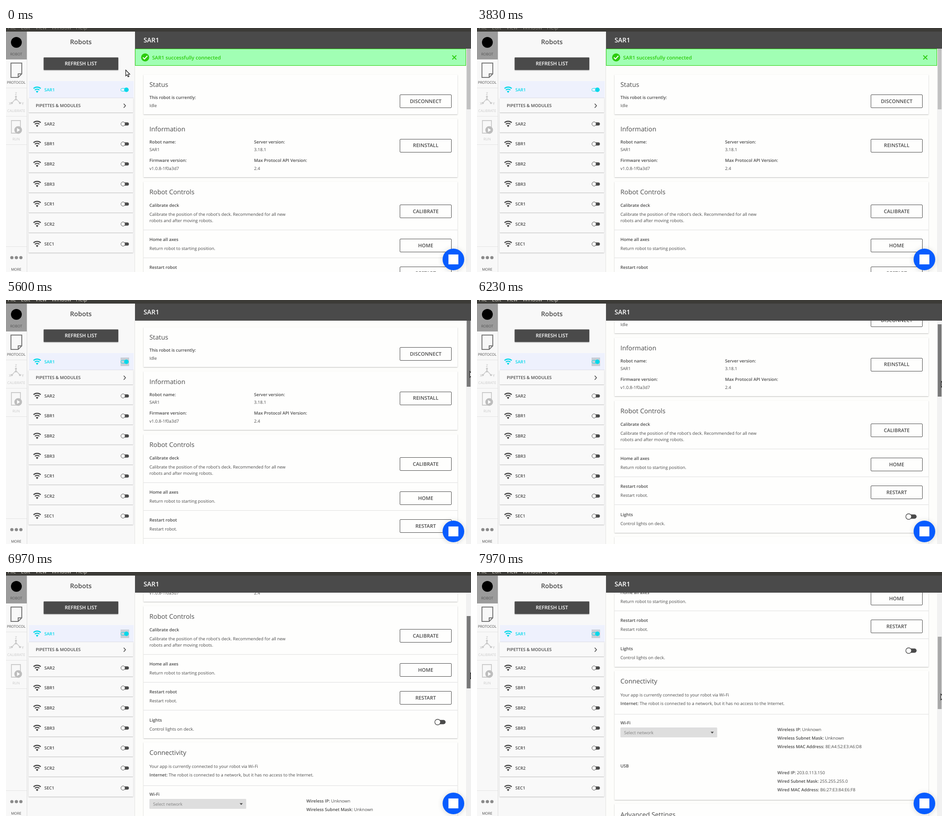
Recreate the animation shown at these times as an HTML page. Size 1031 by 543 pixels, loop 8000 ms.

```html
<!DOCTYPE html>
<html lang="en">
<head>
<meta charset="utf-8">
<title>Robot settings</title>
<style>
  html, body { margin: 0; width: 100%; height: 100%; overflow: hidden; background: #fdfdfb; }
  svg { display: block; width: 100%; height: 100%; }
  text { font-family: "Open Sans", sans-serif; white-space: pre; text-rendering: geometricPrecision; }
  .card, .row { filter: drop-shadow(0 1px .8px rgba(0, 0, 0, .26)); }
  .chat { filter: drop-shadow(0 1px 6px rgba(0, 0, 0, .16)); }
</style>
</head>
<body>
<svg id="stage" viewBox="0 0 1031 543"></svg>
<script>
const DARK = '#4a4a4a', CYAN = '#00d8ea', GREEN = '#2bcc0c', PALE = '#cacaca', WHITE = '#fefefd';
const LOOP = 8000, PRESS = 5000, RELEASE = 7970;

// Drawing helpers; text is placed by the vertical middle of its capitals.
const text = (x, y, str, { size = 9.54, weight = 400, fill = DARK, anchor = 'start' } = {}) =>
  `<text x="${x}" y="${y + size * .36}" font-size="${size}" font-weight="${weight}" fill="${fill}" text-anchor="${anchor}">${str}</text>`;
const bold = (x, y, str, fill = DARK) => text(x, y, str, { weight: 600, fill });
const title = (y, str) => text(318, y, str, { size: 14.3 });
const rect = (x, y, w, h, fill, extra = '') =>
  `<rect x="${x}" y="${y}" width="${w}" height="${h}" fill="${fill}" ${extra}/>`;
const circle = (x, y, r, fill, extra = '') => `<circle cx="${x}" cy="${y}" r="${r}" fill="${fill}" ${extra}/>`;
const line = (d, stroke, width = 1, fill = 'none') =>
  `<path d="${d}" fill="${fill}" stroke="${stroke}" stroke-width="${width}"/>`;
const at = (x, y, inner, scale = 1) => `<g transform="translate(${x} ${y}) scale(${scale})">${inner}</g>`;

const card = (top, bottom) => rect(305, top, 696, bottom - top, WHITE, 'class="card"');
const divider = y => rect(305, Math.floor(y), 696, 1, '#dedede');
const field = (x, y, label, value) => bold(x, y, label) + text(x, y + 17.5, value);
const pair = (x, y, label, value) => text(x, y, `<tspan font-weight="600">${label}</tspan> ${value}`);
const button = (y, label) =>
  rect(873.5, Math.floor(y - 14.5) + .5, 114, 29, WHITE, `rx="1.5" stroke="${DARK}"`) +
  text(930.5, y, label, { size: 11.1, weight: 600, anchor: 'middle' });

const toggleOff = (x, y, scale = 1) => at(x, y,
  rect(-5, -3.5, 14, 7, DARK, 'rx="3.5"') + circle(-4, 0, 4.6, WHITE, `stroke="${DARK}"`), scale);
const toggleOn = (x, y) => at(x, y,
  rect(-8.5, -3.2, 15, 6.4, 'none', `rx="3.2" stroke="${CYAN}"`) + circle(4, 0, 5, CYAN));
const wifi = (y, color) => at(69, y,
  line('M-8-2.8A11.8 11.8 0 0 1 8-2.8', color, 2.4) +
  line('M-5 .6A7.4 7.4 0 0 1 5 .6', color, 2.2) +
  `<path d="M-2.8 3.6A4 4 0 0 1 2.8 3.6L0 7Z" fill="${color}"/>`);

function navBar() {
  const label = (y, str, fill) => text(22.5, y, str, { size: 7.95, fill, anchor: 'middle' });
  const axisName = (x, y, str) => text(x, y, str, { size: 8, weight: 600, fill: PALE, anchor: 'middle' });
  return rect(0, 8, 46, 535, '#f8f8f8') + rect(46, 8, 1, 535, '#dcdcdc') +
    rect(0, 8, 46, 62, '#9b9b9b') +
    [133, 196, 259, 486].map(y => rect(0, y, 46, 1, '#e4e4e4')).join('') +
    circle(23, 32, 12, '#000') + label(58.3, 'ROBOT', '#555') +
    line('M11 78H35V102L27 110H11ZM35 102H27V110', '#777', 2) + label(121.3, 'PROTOCOL', DARK) +
    line('M22 157V152M22 157L14 166M22 157L30 166', PALE, 1.6) +
    [[22, 153], [22, 159], [13, 167], [31, 167]].map(([x, y]) => circle(x, y, 2.3, PALE)).join('') +
    axisName(22, 146, 'Z') + axisName(9, 168, 'X') + axisName(37, 168, 'Y') + label(184.3, 'CALIBRATE', PALE) +
    line('M12 206H32V228L26 234H12Z', PALE, 1.8) + circle(27, 227, 8.5, '#bdbdbd') +
    '<path d="M24.5 222.5L31 227L24.5 231.5Z" fill="#fff"/>' + label(247, 'RUN', PALE) +
    [13, 23, 33].map(x => circle(x, 511, 3.6, '#8a8a8a')).join('') + label(537, 'MORE', DARK);
}

function robotPanel() {
  const others = ['SAR2', 'SBR1', 'SBR2', 'SBR3', 'SCR1', 'SCR2', 'SEC1'].map((name, i) => {
    const y = 213.5 + i * 44.55;
    return rect(50, y - 24, 232, 43, '#f9f9f9', 'class="row"') +
      wifi(y, DARK) + bold(85, y, name) + toggleOff(263.5, y);
  });
  return rect(47, 8, 239, 535, '#f8f8f8') + rect(285, 46, 1, 497, '#e2e2e2') +
    text(166, 30.5, 'Robots', { size: 14.3, weight: 600, anchor: 'middle' }) +
    rect(83.5, 65.5, 165.5, 28, DARK, 'rx="1" class="card"') +
    text(166, 79.5, 'REFRESH LIST', { size: 11.1, weight: 600, fill: '#fff', anchor: 'middle' }) +
    rect(50, 156, 232, 32, '#f9f9f9', 'class="row"') +
    rect(51, 118, 232, 38, '#eef1fd') + rect(51, 155, 232, 1, '#dcdee6') +
    rect(254, 128, 19, 19, '#c9ced6', 'id="focus"') +
    wifi(137.5, CYAN) + bold(85, 137.5, 'SAR1', CYAN) + toggleOn(263, 137.5) +
    bold(66, 172.5, 'PIPETTES &amp; MODULES') + line('M261 168.5L265 173L261 177.5', DARK, 1.6) +
    others.join('');
}

function page() {
  const toast = rect(286.5, 46.5, 733, 37, '#a1ffb4', `stroke="${GREEN}"`) +
    circle(308.5, 65.5, 9, GREEN) + line('M303.5 65.5L307 69L313.5 62', '#fff', 2) +
    text(324, 66, 'SAR1 successfully connected', { size: 11.1, weight: 600, fill: GREEN }) +
    line('M989.5 61L998.5 70M998.5 61L989.5 70', GREEN, 1.8);
  const status = card(104, 192) + title(126, 'Status') +
    field(318, 155, 'This robot is currently:', 'Idle') + button(163, 'DISCONNECT');
  const information = card(202, 332) + title(224.5, 'Information') +
    field(318, 253.5, 'Robot name:', 'SAR1') + field(550, 253.5, 'Server version:', '3.18.1') +
    field(318, 295, 'Firmware version:', 'v1.0.8-1f0a3d7') +
    field(550, 295, 'Max Protocol API Version:', '2.4') + button(261.5, 'REINSTALL');
  const controls = card(342, 636) + title(364.5, 'Robot Controls') + [449.5, 511.5, 573.5].map(divider).join('') +
    bold(318, 395, 'Calibrate deck') +
    text(318, 414.7, "Calibrate the position of the robot's deck. Recommended for all new") +
    text(318, 429, 'robots and after moving robots.') + button(407.7, 'CALIBRATE') +
    bold(318, 471, 'Home all axes') + text(318, 491, 'Return robot to starting position.') + button(484, 'HOME') +
    bold(318, 533, 'Restart robot') + text(318, 553, 'Restart robot.') + button(546, 'RESTART') +
    bold(318, 595.5, 'Lights') + text(318, 615.5, 'Control lights on deck.') + toggleOff(962.5, 600, 1.36);
  const connectivity = card(645, 932) + title(668, 'Connectivity') + divider(741) +
    text(318, 699, 'Your app is currently connected to your robot via Wi-Fi') +
    pair(318, 718, 'Internet:', 'The robot is connected to a network, but it has no access to the Internet.') +
    bold(318, 761, 'Wi-Fi') + rect(318, 771, 214.5, 22, '#dedede', 'rx="1.5"') +
    text(326, 782.3, 'Select network', { fill: '#808080' }) + `<path d="M518 780.5H525L521.5 784.5Z" fill="${DARK}"/>` +
    pair(666, 776, 'Wireless IP:', 'Unknown') + pair(666, 795, 'Wireless Subnet Mask:', 'Unknown') +
    pair(666, 814, 'Wireless MAC Address:', '8E:A4:52:E3:A6:D8') +
    bold(318, 856.5, 'USB') +
    pair(666, 871.5, 'Wired IP:', '203.0.113.150') + pair(666, 890.5, 'Wired Subnet Mask:', '255.255.255.0') +
    pair(666, 909.5, 'Wired MAC Address:', 'B6:27:E3:84:E6:F8');
  return toast + status + information + controls + connectivity + card(941, 1100) + title(964.5, 'Advanced Settings');
}

const menu = [[4, 'File'], [33, 'Edit'], [65, 'View'], [101, 'Window'], [155, 'Help']]
  .map(([x, str]) => `<text x="${x}" y="3" font-size="11.6">${str}</text>`).join('');

document.getElementById('stage').innerHTML =
  rect(0, 0, 1031, 543, '#fdfdfb') + `<g id="page">${page()}</g>` +
  rect(1020, 46, 11, 497, '#f1f1f1') + rect(1021.5, 20, 8.5, 161, '#c1c1c1', 'id="thumb"') +
  navBar() + robotPanel() +
  rect(286, 8, 745, 38, DARK) + text(305, 27.2, 'SAR1', { size: 14.3, weight: 600, fill: '#fff' }) +
  rect(0, 0, 1031, 8, '#3c3b37') + `<g id="menu">${menu}</g>` +
  circle(992, 515, 24, '#075cff', 'class="chat"') + rect(981, 504, 22, 22, '#fff') +
  `<g id="cursor">${line('M.5 .5V13.6L3.4 10.9L5.6 15.6L7.8 14.6L5.7 10H9.6Z', '#111', 1.2, '#fff')}</g>`;

const [pageEl, thumb, focusBox, menuEl, cursor] =
  ['page', 'thumb', 'focus', 'menu', 'cursor'].map(id => document.getElementById(id));

// Smooth curve through [time, value] knots.
function curve(knots, t) {
  const last = knots.length - 1;
  if (t <= knots[0][0]) return knots[0][1];
  if (t >= knots[last][0]) return knots[last][1];
  const i = knots.findIndex(k => k[0] > t) - 1;
  const slope = j => {
    const a = knots[Math.max(j - 1, 0)], b = knots[Math.min(j + 1, last)];
    return (b[1] - a[1]) / (b[0] - a[0]);
  };
  const [t0, v0] = knots[i], [t1, v1] = knots[i + 1], h = t1 - t0, u = (t - t0) / h;
  return v0 + (v1 - v0) * u * u * (3 - 2 * u) +
    h * u * (1 - u) * (slope(i) * (1 - u) - slope(i + 1) * u);
}

const scrollKnots = [[5000, 0], [5600, 43], [6230, 118], [6970, 266], [7970, 425]];
const dragKnots = [[5000, 1028], [5600, 1028], [6230, 1029], [6970, 1029.5], [7970, 1028]];
const moves = [
  { start: 1500, end: 2230, steps: 8, from: [265, 90.4], to: [537, 98] },
  { start: 2330, end: 2930, steps: 7, from: [537, 98], to: [753, 186] },
  { start: 3300, end: 3830, steps: 11, from: [753, 186], to: [1034, 146] },
  { start: 4270, end: 4500, steps: 4, from: [1031, 146], to: [1028, 146] },
];

function pointer(t, scroll) {
  if (t >= PRESS) return [curve(dragKnots, t), 146 + scroll * .294];
  const move = moves.filter(m => t >= m.start).pop();
  if (!move) return [265, 93];
  const { start, end, steps, from, to } = move;
  const p = Math.min(1, (1 + Math.floor((t - start) / (end - start) * (steps - 1))) / steps);
  const eased = (p + p * p * (3 - 2 * p)) / 2;
  return from.map((v, i) => v + (to[i] - v) * eased);
}

function draw() {
  const t = performance.now() % LOOP, pressed = t >= PRESS;
  const dragging = pressed && t < RELEASE;
  const scroll = Math.round(curve(scrollKnots, t));
  const [x, y] = pointer(t, scroll).map(v => Math.round(v * 2) / 2);
  const hovered = x >= 1020 && x < 1031;
  pageEl.setAttribute('transform', `translate(0 ${-scroll})`);
  thumb.setAttribute('y', Math.floor(20 + scroll * .294));
  thumb.setAttribute('fill', dragging ? '#787878' : hovered ? '#a8a8a8' : '#c1c1c1');
  focusBox.setAttribute('visibility', pressed ? 'visible' : 'hidden');
  menuEl.setAttribute('fill', pressed ? '#dfdbd2' : '#8c8a82');
  menuEl.setAttribute('transform', `translate(0 ${pressed ? -.5 : 0})`);
  cursor.setAttribute('transform', `translate(${x} ${y})`);
  requestAnimationFrame(draw);
}
draw();
</script>
</body>
</html>
```
